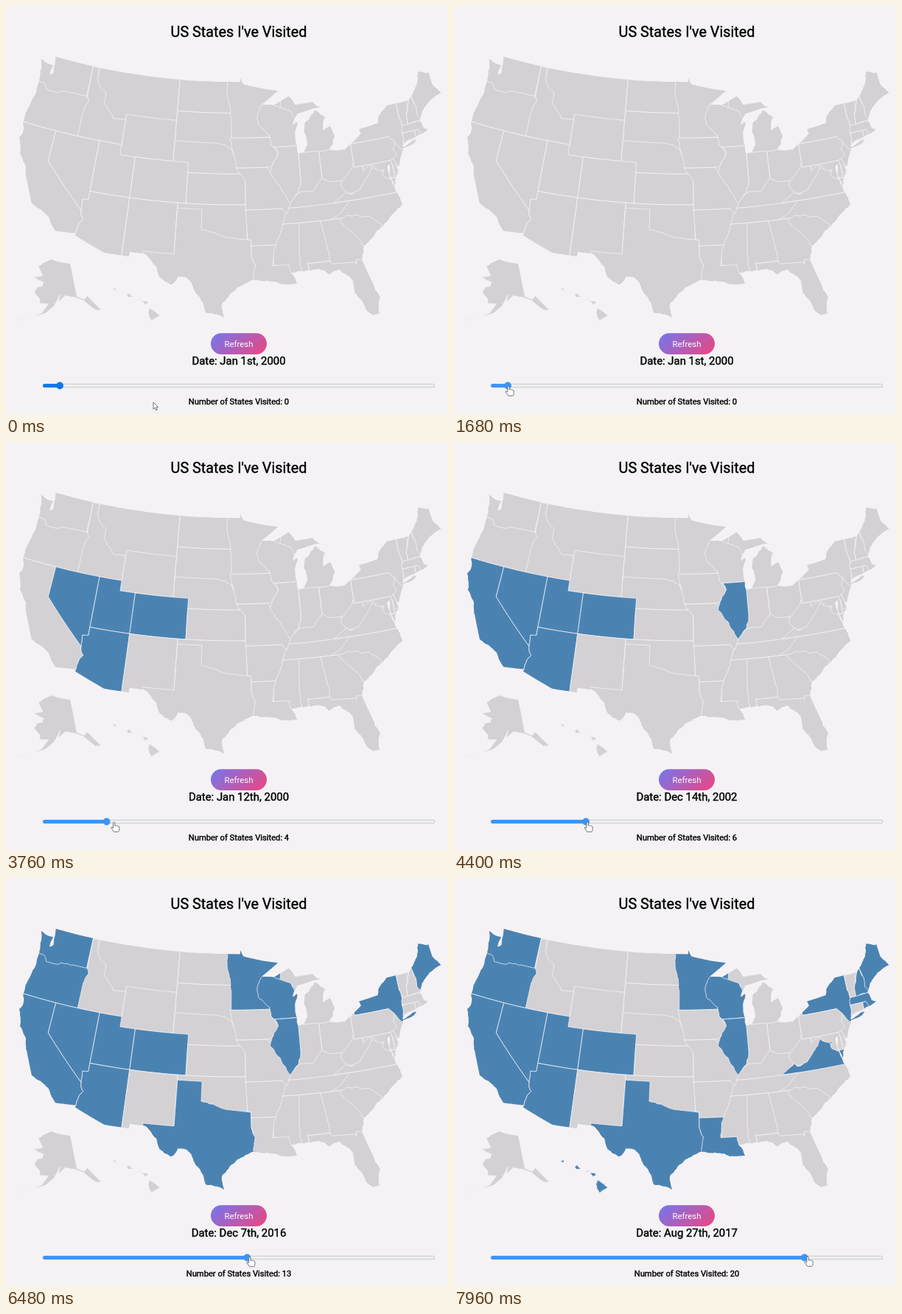
An HTML page that plays this animation: 600x554 px, repeating every 8000 ms.

```html
<!DOCTYPE html>
<html lang="en">
<head>
<meta charset="utf-8">
<title>US States I've Visited</title>
<style>
  html, body { margin: 0; width: 100%; height: 100%; overflow: hidden; background: #f4f2f5; }
  svg { display: block; width: 100vw; height: 100vh; }
  text { font-family: Roboto, Arial, sans-serif; text-anchor: middle; stroke: #000; stroke-width: .4; }
  .land { fill: #d3d1d4; }
  #map path { stroke: #f6f5f7; stroke-width: .75; stroke-linejoin: round; }
  .on { fill: #4a83b2; }
  #refresh { fill: #fff; stroke: none; }
  .cursor { fill: #fff; stroke: #555; stroke-width: .8; stroke-linejoin: round; }
</style>
</head>
<body>
<svg viewBox="0 0 600 554">
  <defs>
    <linearGradient id="pill" gradientUnits="userSpaceOnUse" x1="290" y1="432.6" x2="342" y2="484.6">
      <stop stop-color="#7277ee"/>
      <stop offset="1" stop-color="#ee457f"/>
    </linearGradient>
    <clipPath id="shore"><path id="coast"/></clipPath>
  </defs>
  <rect width="600" height="554" fill="#f4f2f5"/>
  <text x="316" y="42.3" font-size="19.8">US States I've Visited</text>
  <use href="#coast" class="land"/>
  <g id="map"></g>
  <rect x="278" y="444.3" width="76" height="28.6" rx="14.3" fill="url(#pill)"/>
  <text id="refresh" x="316" y="462.6" font-size="11.4">Refresh</text>
  <text id="date" x="316" y="487.4" font-size="14.9"></text>
  <rect x="50.3" y="513.3" width="531.6" height="4.4" rx="2.2" fill="#f0eff1" stroke="#b9b8bb" stroke-width=".7"/>
  <rect id="fill" x="50" y="513" height="5" rx="2.5"/>
  <circle id="thumb" cy="515.5" r="4.9"/>
  <text id="count" x="316" y="541.2" font-size="11.2"></text>
  <path id="arrow" class="cursor" d="M0 0V9.4L2.2 7.4 3.8 10.9 5.3 10.2 3.8 6.9H6.6Z"/>
  <path id="hand" class="cursor" d="M-1.2 .8Q0-.8 1.2.8V5Q2.4 4 3.4 5.2 4.6 4.4 5.4 5.7 7 5.2 7.2 7V9.6Q7 12 5.8 13.3H-.3Q-1.6 11-3.7 8.4-4.2 6.6-2.6 7.2L-1.2 8.4Z"/>
</svg>
<script>
const LOOP = 8000;

// Points are "degrees west,degrees north"; "/" parts shapes.
const coast = [
  // Pacific
  '122.75,49 122.4,47.4 122.9,47.1 122.75,48.15 124.7,48.38 124.1,46.7 124,45 124.55,42.84 124.1,41 124.4,40.4 123.7,38.9 122.5,37.8 121.9,36.6 120.64,34.6 119.2,34.15 118.4,33.8 117.12,32.53',
  // Southern border
  '114.72,32.72 114.81,32.5 111.07,31.33 108.2,31.33 108.2,31.78 106.53,31.78 104.9,30.6 104.5,29.65 103.15,28.98 102.4,29.85 101.4,29.77 100.3,28.3 99.1,26.4 97.15,25.96',
  // Gulf
  '97.4,27.3 96.4,28.4 94.7,29.4 93.85,29.7 91.8,29.5 90.2,29.1 89,29.1 89.6,30.2 88,30.3 86.5,30.38 85.3,29.7 84.1,30.1 82.7,28.8 82.7,27.6 81.8,26 81.1,25.15 80.4,25.2',
  // Atlantic
  '80.05,26.8 80.6,28.3 81.4,30.7 80.9,32.05 79.2,33.2 77.95,33.87 76.6,34.7 75.5,35.25 76,36.9 76.3,38 76.4,39.2 76,39.4 76.2,38.5 75.95,37.2 75.1,38.4 75.5,39.5 74.9,38.95 74,40.3 73.8,40.9 72.9,41.25 71.4,41.5 70.6,41.6 70,41.75 70.6,42 70.8,42.8 70.2,43.6 68.8,44.4 66.97,44.8',
  // Northern border and Great Lakes
  '67.78,45.9 67.8,47.07 69.2,47.45 70.3,45.9 71.08,45.3 71.5,45.01 74.7,45 76.2,44 76.4,43.5 79.05,43.27 78.9,42.8 81.5,41.5 83.45,41.73 82.45,43 82.9,44.05 83.9,43.7 83.4,45 84.75,45.78 86.2,44.7 86.5,43.7 86.2,42.6 86.9,41.75 87.6,41.7 87.8,43 87.3,44.8 88,44.55 87.2,45.6 84.8,45.95 83.9,46 84.9,46.6 87.4,46.5 88.2,47.4 90.4,46.6 92.1,46.75 89.7,48 92,48.3 94.6,48.75 95.15,49.38 95.15,49'
].join(' ') + '/74,40.6 72.3,41.15 71.87,41.07 72.8,40.7';

// Painted in order, so later states trim earlier ones, and cut at the coast.
// Two points are opposite corners of a box.
const states = {
  WA: '126,49.1 117.03,45.5',
  MT: '116.05,49.1 104.05,44.3',
  OR: '125,46.25 123.3,46.2 122.75,45.65 121.2,45.65 119,46 116.5,46 116.5,42 125,42',
  ID: '117.03,49 116.05,49 116.05,48 114.4,46.65 114.4,45.6 113.45,44.95 112.8,44.4 111.05,44.5 111.05,42 117.03,42 117.03,43.9 116.6,45.5 116.92,46.1',
  CA: '126,42 120,42 120,39 114.63,35 114.2,34.2 114.72,32.72 117,32 126,32',
  NV: '120,42 114.04,42 114.04,36.2 114.75,36.1 114.63,35 120,39',
  UT: '114.04,42 109.05,37',
  AZ: '114.04,37 109.05,37 109.05,31.3 111.07,31.3 114.81,32.5 114.72,32.72 114.2,34.2 114.63,35 114.75,36.1 114.04,36.2',
  WY: '111.05,45 104.05,41',
  ND: '104.05,49.1 96,45.94',
  SD: '104.05,45.94 96,42.4',
  NE: '104.05,43 98.5,43 97.2,42.8 96.4,42.4 95,40 104.05,40',
  CO: '109.05,41 102.05,37',
  NM: '109.05,37 103.04,31.3',
  KS: '102.05,40 94.62,37',
  OK: '103.04,37 94.5,33.5',
  TX: '103.04,36.5 100,36.5 100,34.56 98.1,34.13 96.6,33.8 94.04,33.55 94.04,32 93.6,31.1 93.75,29 97,25 107,30 106.62,32 103.04,32',
  MN: '97.2,49.5 97.1,48 96.56,45.94 96.45,45.3 96.45,43.5 90,43.5 89,49.5',
  WI: '92.1,46.7 92.85,45.6 92.7,44.7 91.2,43.7 91.1,42.8 90.64,42.5 86.9,42.5 87,45 87.6,45.1 88.1,45.92 90.4,46.6 90.5,47.2',
  IA: '96.6,43.5 91.2,43.5 91.1,42.8 90.2,41.8 91.1,40.7 91.6,40.6 95.77,40.58 96.1,41.7',
  MS: '91.5,35 88,30',
  GA: '85.6,35 80.5,30.5',
  FL: '87.6,31 85,31 84.86,30.7 82.2,30.57 82.05,30.36 82,30.75 81,30.75 79,25 83,24 87.5,30',
  AL: '88.2,35 85.6,35 85.2,32.7 85,31 87.6,31 87.5,30 88.4,30 88.47,31.9',
  NC: '84.3,36.57 75,36.57 75,33.5 79,33.5 83.1,35 84.3,35',
  SC: '83.1,35 82.3,35.2 81,35.1 80.8,34.82 79.67,34.8 78.4,33.7 80,31.5 81.1,32.1 81.5,33 83.3,34.7',
  KY: '89.4,36.5 89.2,37 88,38 84.8,39.3 82.3,38.8 81.9,37 83.7,36.5',
  MD: '79.48,39.72 75.7,38',
  WV: '80.52,39.72 79.48,39.72 79.48,39.2 78.3,39.65 77.75,39.3 78.3,39 80,37 82,37.4 82.6,38.2 82.2,38.8 80.5,40.8',
  VA: '83.7,36.57 75,36.57 75,38 75.9,38 76.4,37.95 77.1,38.4 77.1,38.9 78.3,39.45 79.3,38.4 80.3,37.5 81.7,37.2 82,37.5',
  DC: '77.12,38.99 76.9,38.8',
  TN: '90.3,35 89.5,36.5 81.68,36.57 82.5,36 84.32,35',
  OH: '84.81,41.7 83.45,41.73 81,42.2 80.52,42.2 80.52,40.6 80.8,39.7 82.2,38.6 83.6,38.65 84.82,39.1',
  IN: '87.53,41.8 84.81,41.76 84.82,39.1 86,38 88,37.9 87.53,39.3',
  MO: '95.77,40.58 91.73,40.58 89,38 89.1,36.9 89.5,36 90.37,36 90.15,36.5 94.62,36.5 94.62,39.1 95,39.8',
  IL: '90.64,42.5 87,42.5 87.53,41.7 87.53,39.3 88,37.9 89.1,37 89.5,37.5 90.2,38.7 91.4,39.9 91.1,40.7 90.2,41.8',
  AR: '94.62,36.5 90.15,36.5 89.7,36 90.2,35 91.15,33 94.04,33 94.04,33.55 94.45,33.6',
  LA: '94.04,33 91.15,33 91.6,31 89.73,31 89.6,30.2 88.5,29.5 89,28 94,29 93.75,30.4 93.6,31.1 94.04,32',
  NY: '80,42 79,44 75,45.5 73.35,45.5 73.4,43.6 73.27,42.75 73.5,42 73.7,41 71,41.2 72,40 74.1,40.5 74.7,41.36 75.4,42',
  PA: '80.52,42 75.35,42 74.75,41.4 75.15,40.7 74.8,40.2 75.5,39.72 80.52,39.72',
  DE: '75.79,39.72 75.4,39.8 75,38.45 75.7,38.45',
  ME: '71.08,45.3 71,43.4 70.6,43 66,43 66,48 70,48',
  VT: '73.35,45.01 71.5,45.01 72.4,43.5 72.46,42.73 73.27,42.73 73.4,43.6',
  NH: '71.5,45.1 71.05,45.3 70.95,43.4 70.6,43 70.8,42.8 72.46,42.73 72.4,43.5',
  MA: '73.5,42.04 73.27,42.74 70.8,42.8 69,43 69,41 71.1,41.4 71.38,42.02',
  CT: '73.5,42.04 71.8,42.02 71.85,41.25 73.7,41',
  RI: '71.8,42.02 71.38,42.02 71.1,41.3 71.85,41.2',
  AK: '141,69.65 152,70.85 156.5,71.35 162,70.3 166.2,68.87 162,66.5 168,65.6 161,64.6 161.5,63.5 164.5,63.1 166,61.6 162,59.9 162,58.65 157.2,58.75 160.3,56.1 164.8,54.6 158.5,56 154,58.2 150.5,61.3 151.8,59.25 147.5,60.9 142,60.05 137.9,58.7 133.2,55.1 130.5,54.8 135.2,59.7 137.5,59 141,60.3',
  HI: '159.78,22.05 159.4,22.2 159.45,21.9/158.28,21.57 157.98,21.7 157.65,21.3 158.1,21.3/157.3,21.1 156.7,21.17 156.85,21.05/156.7,20.95 156.25,20.93 156,20.75 156.4,20.58/155.9,20.25 154.82,19.5 155.68,18.92 156.05,19.75'
};

const visits = 'UT AZ NV CO CA IL MN WI WA OR TX ME NY MA RI HI NH LA VA DC'.split(' ');

// Slider value and date; values between are interpolated
const dateKeys = [[1, '2000-01-01'], [4, '2000-01-12'], [6, '2002-12-14'], [10, '2016-08-09'],
  [16, '2017-04-07'], [20, '2017-08-27']].map(([v, s]) => [v, Date.parse(s)]);

// Pointer: time, x, y
const track = [[0, 200, 538], [250, 200, 538], [1300, 74, 516], [1700, 74, 516], [3760, 146.6, 516],
  [4400, 181, 516], [5720, 268, 515], [7120, 383.5, 514], [8000, 484.5, 514]];

const $ = id => document.getElementById(id);
const rad = Math.PI / 180;
const mix = (a, b, u) => a + (b - a) * u;
const noise = (x, y) => {
  const v = Math.sin(x * 12.99 + y * 78.23) * 43758.5;
  return v - Math.floor(v) - .5;
};

// Conic equal-area projection that puts (lon, lat) at (x, y)
function conic(low, high, axis, lon, lat, scale, x, y) {
  const s = Math.sin(low * rad), n = (s + Math.sin(high * rad)) / 2;
  const c = 1 - s * s + 2 * n * s;
  const raw = (w, h) => {
    const r = scale * Math.sqrt(c - 2 * n * Math.sin(h * rad)) / n, a = n * (axis - w) * rad;
    return [r * Math.sin(a), r * Math.cos(a)];
  };
  const [cx, cy] = raw(lon, lat);
  return ([w, h]) => {
    const [px, py] = raw(w, h);
    return [x + px - cx, y + py - cy];
  };
}

const mainland = conic(29.5, 45.5, 96, 96.6, 38.7, 793, 303.8, 246.3);
const insets = {
  AK: conic(55, 65, 154, 156, 58.5, 277.6, 60.3, 405.7),
  HI: conic(8, 18, 157, 160, 19.9, 793, 141.2, 414.4)
};

// Surveyed lines stay straight; short slanted ones wander like rivers and shores.
function edge(a, b, depth, rough) {
  if (!depth) return [a];
  const m = [(a[0] + b[0]) / 2, (a[1] + b[1]) / 2];
  if (rough) {
    const size = .22 * Math.hypot(b[0] - a[0], b[1] - a[1]);
    const [x, y] = m;
    m[0] += size * noise(x, y);
    m[1] += size * .7 * noise(y, x);
  }
  return [...edge(a, m, depth - 1, rough), ...edge(m, b, depth - 1, rough)];
}

function outline(shape, project = mainland) {
  return shape.split('/').map(part => {
    let pts = part.split(' ').map(p => p.split(',').map(Number));
    if (pts.length === 2) {
      const [[w, n], [e, s]] = pts;
      pts = [[w, n], [e, n], [e, s], [w, s]];
    }
    const line = pts.flatMap((a, i) => {
      const b = pts[(i + 1) % pts.length];
      const dw = Math.abs(a[0] - b[0]), dh = Math.abs(a[1] - b[1]);
      return edge(a, b, 3, dw > .06 && dh > .06 && Math.hypot(dw, dh) < 2.3);
    });
    return 'M' + line.map(p => project(p).map(v => v.toFixed(2)).join(' ')).join('L') + 'Z';
  }).join('');
}

// Island chain off Alaska
for (let w = 165.5, h = 54.2; w < 172; w += 1.5, h -= .35) {
  states.AK += `/${w},${h} ${w + 1.1},${h - .5} ${w + .7},${h}`;
}

$('coast').setAttribute('d', outline(coast));
$('map').innerHTML = Object.entries(states).map(([id, shape]) => {
  const cut = insets[id] ? 'stroke="none"' : 'clip-path="url(#shore)"';
  return `<path id="${id}" class="land" ${cut} d="${outline(shape, insets[id])}"/>`;
}).join('');

function pointer(t) {
  const i = track.findIndex(k => k[0] > t);
  const [t0, x0, y0] = track[i - 1], [t1, x1, y1] = track[i];
  let u = (t - t0) / (t1 - t0);
  if (i === 2) u = u * u * (3 - 2 * u);
  return [mix(x0, x1, u), mix(y0, y1, u)];
}

function dateText(value) {
  const i = Math.max(1, dateKeys.findIndex(k => k[0] >= value));
  const [v0, d0] = dateKeys[i - 1], [v1, d1] = dateKeys[i];
  const date = new Date(mix(d0, d1, (value - v0) / (v1 - v0)));
  const day = date.getUTCDate();
  const teen = day > 10 && day < 14;
  const suffix = (!teen && ['', 'st', 'nd', 'rd'][day % 10]) || 'th';
  const month = date.toLocaleString('en-US', { month: 'short', timeZone: 'UTC' });
  return `${month} ${day}${suffix}, ${date.getUTCFullYear()}`;
}

function draw(t) {
  const [x, y] = pointer(t);
  const value = Math.min(20, t < 1700 ? 1 : Math.max(1, Math.round((x - 52) / 21.2)));
  const count = value > 1 ? value : 0;
  const over = y < 523;
  const thumb = 51.8 + 21.2 * value;
  const color = over ? '#3c95f4' : '#1078ea';

  visits.forEach((id, i) => $(id).setAttribute('class', i < count ? 'on' : 'land'));
  $('date').textContent = 'Date: ' + dateText(value);
  $('count').textContent = 'Number of States Visited: ' + count;
  $('fill').setAttribute('width', thumb - 50);
  $('thumb').setAttribute('cx', thumb);
  $('fill').setAttribute('fill', color);
  $('thumb').setAttribute('fill', color);
  for (const [id, shown] of [['arrow', !over], ['hand', over]]) {
    $(id).setAttribute('transform', `translate(${x} ${y})`);
    $(id).setAttribute('visibility', shown ? 'visible' : 'hidden');
  }
}

const start = performance.now();
function tick() {
  draw((performance.now() - start) % LOOP);
  requestAnimationFrame(tick);
}
tick();
</script>
</body>
</html>
```
